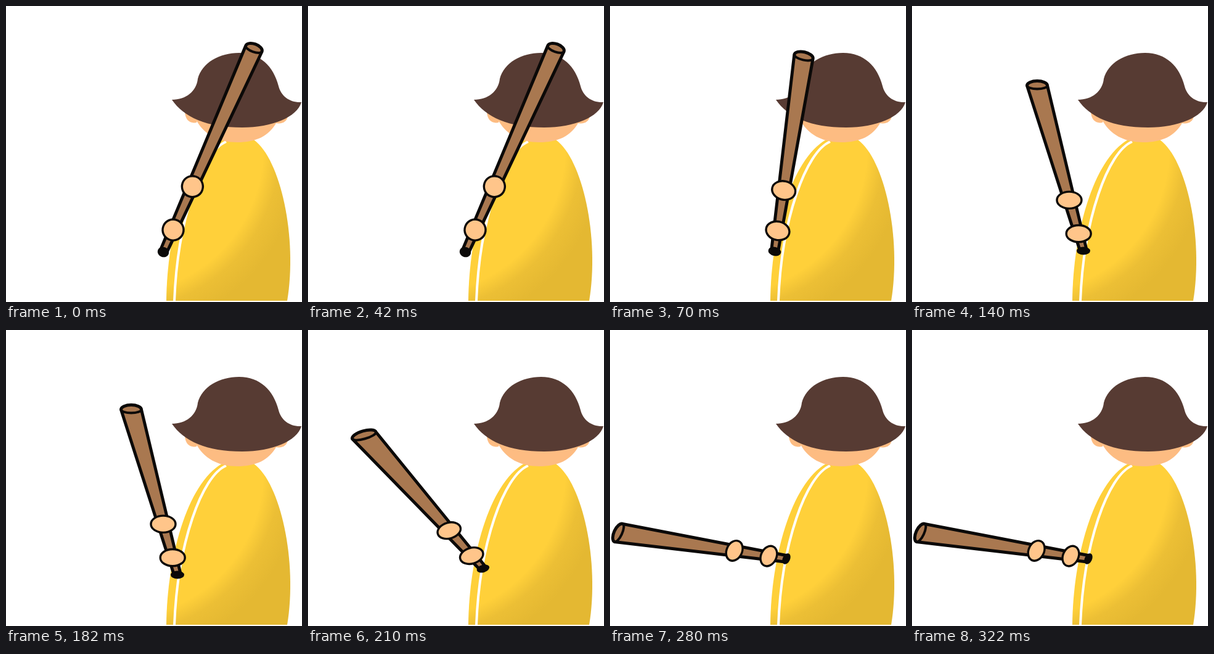
An HTML page for the animation above (0.35 s loop, 480 by 480 pixels).

```html
<!DOCTYPE html>
<html lang="en">
<head>
<meta charset="utf-8">
<title>Batter</title>
<style>
  html, body { margin: 0; width: 100%; height: 100%; overflow: hidden; background: #fff; }
  svg { display: block; width: 100vw; height: 100vh; }
  .pose { opacity: 0; animation: show 350ms step-end infinite; }
  .bat { fill: #a97850; stroke: #0b0908; stroke-width: 5; stroke-linejoin: round; }
  .rim { fill: none; stroke-width: 4; }
  .hand { fill: #ffc58a; stroke: #0b0908; stroke-width: 3.4; }
  .knob { fill: #0b0908; }
  @keyframes show {
    0% { opacity: 1; }
    20%, 100% { opacity: 0; }
  }
</style>
</head>
<body>
<svg id="stage" viewBox="0 0 480 480">
  <defs>
    <radialGradient id="cloth" gradientUnits="userSpaceOnUse" cx="180" cy="230" r="300">
      <stop offset=".79" stop-color="#ffd03a"/>
      <stop offset=".88" stop-color="#ecbf35"/>
      <stop offset="1" stop-color="#e4b832"/>
    </radialGradient>
  </defs>
  <path fill="url(#cloth)" d="M260 478C261 371 293 250 350 217H402C445 248 473 375 456 478Z"/>
  <path fill="none" stroke="#fff" stroke-width="4" d="M357 220C318 236 278 345 273 479"/>
  <g fill="#fdbc82">
    <path d="M290 172C291 185 298 191 309 189L312 178Z"/>
    <path d="M457 178C456 187 449 192 437 190L434 180Z"/>
    <path d="M307 182C320 209 345 221 375 221C405 221 427 211 439 188Z"/>
  </g>
  <path fill="#573b33" d="M269 152C292 152 309 138 311 118C318 92 346 76 378 76C412 76 434 98 442 130C446 146 460 157 479 156C472 180 432 197 383 197C325 197 288 180 269 152Z"/>
</svg>
<script>
  const stage = document.getElementById('stage');
  const STEP = 70, GRIP = 5.5;

  // Key poses of the swing: bat ends, half-width at the tip, tilt of the round parts.
  const poses = [
    { tip: [402, 69], end: [255, 399], girth: 14, tilt: 20 },
    { tip: [314, 82], end: [267, 398], girth: 15.5, tilt: 13 },
    { tip: [203, 129], end: [278, 397], girth: 16.5, tilt: 0 },
    { tip: [91, 171], end: [284, 387], girth: 20, tilt: -16 },
    { tip: [14, 329], end: [286, 371], girth: 16, tilt: -65 }
  ];

  const oval = (cls, [x, y], rx, ry, tilt) =>
    `<ellipse class="${cls}" rx="${rx}" ry="${ry}" transform="translate(${x} ${y}) rotate(${tilt})"/>`;

  function drawPose({ tip, end, girth, tilt }, i) {
    const a = tilt * Math.PI / 180;
    const side = ([x, y], d) => [x + d * Math.cos(a), y + d * Math.sin(a)];
    const along = k => tip.map((v, j) => v + (end[j] - v) * k);
    const left = side(tip, -girth), right = side(tip, girth);
    const arc = (ry, sweep) => `M${left}A${girth} ${ry} ${tilt} 0 ${sweep} ${right}`;

    // Fists flatten as the bat turns; a nearer tip pushes them toward the knob.
    const turn = i / (poses.length - 1), near = girth - 16;
    const rx = 17 + 3 * Math.sin(Math.PI * turn);
    const ry = 12.5 + 4.5 * (1 - turn) ** 2;
    const fist = k => oval('hand', along(k), rx, ry, tilt);

    return `<g class="pose" style="animation-delay:${(i - poses.length) * STEP}ms">
      <path class="bat" d="${arc(7.5, 1)}L${side(end, GRIP)}L${side(end, -GRIP)}Z"/>
      <path class="bat rim" d="${arc(5.5, 0)}"/>
      ${oval('knob', end, rx * .55, ry * .48, tilt)}
      ${fist(.69 + .006 * near)}${fist(.895 + .002 * near)}
    </g>`;
  }

  stage.insertAdjacentHTML('beforeend', poses.map(drawPose).join(''));
</script>
</body>
</html>
```
